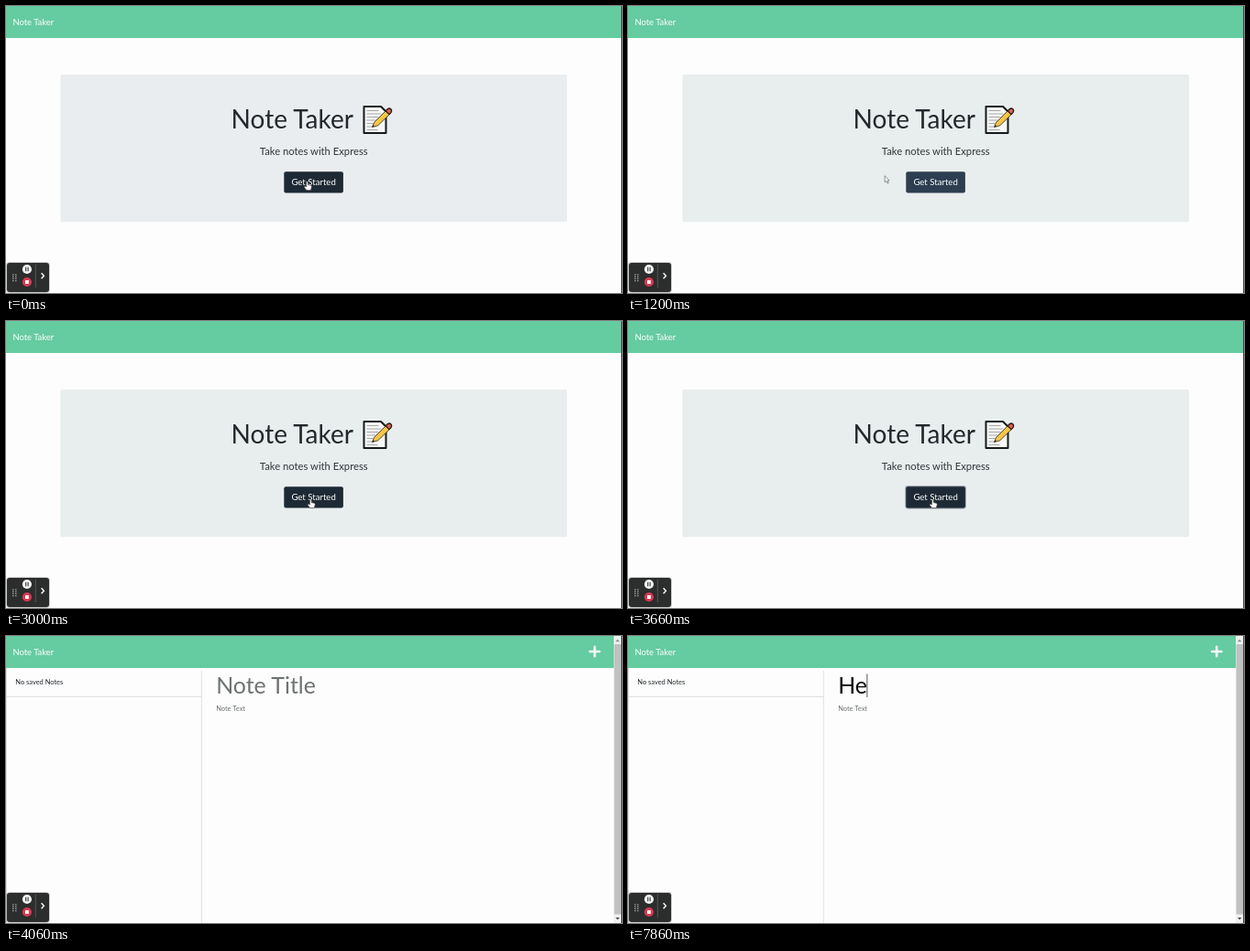
An HTML page for the animation above (8000 ms loop, 672 by 314 pixels).

```html
<!DOCTYPE html>
<html lang="en">
<head>
<meta charset="utf-8">
<title>Note Taker</title>
<style>
html, body { margin: 0; width: 100%; height: 100%; overflow: hidden; background: #fdfdfd; }
svg { display: block; width: 672px; height: 314px; font-family: Lato, sans-serif; }
</style>
</head>
<body>
<svg viewBox="0 0 672 314">
  <rect width="672" height="314" fill="#fdfdfd"/>
  <rect width="672" height="35" fill="#65cba0"/>
  <text x="7.5" y="20.8" font-size="9.4" fill="#fff">Note Taker</text>

  <g id="home">
    <rect id="panel" x="59.5" y="75" width="552.5" height="161.3" rx="1.5"/>
    <text x="245.6" y="134" font-size="28" fill="#23282c">Note Taker</text>
    <g stroke-linejoin="round">
      <path d="M390.5 110H409l5.5 5.5V139H390.5Z" fill="#f7f7f5" stroke="#15191b" stroke-width="2"/>
      <path d="M393.5 114.5h13M393.5 118h16M393.5 121.5h13M393.5 125h10M393.5 128.5h7M393.5 132h6M393.5 135.5h12" stroke="#a3a8aa"/>
      <path d="M399.5 132.5l2.2-5.2L416 113l4 4-14.3 13.8Z" fill="#f6c644" stroke="#2a2520" stroke-width=".8"/>
      <path d="M414.2 114.8l2-2q2-1.6 3.6 0t.2 3.8l-2 2Z" fill="#d9634f" stroke="#2a1a18" stroke-width="1.3"/>
      <path d="M399.5 132.5l1-2.5 1.6 1.6Z" fill="#222"/>
    </g>
    <text x="335.8" y="163" font-size="11.25" fill="#30363a" text-anchor="middle">Take notes with Express</text>
    <rect id="focus" x="302.4" y="180.2" width="66.4" height="25.2" rx="2.8" fill="#8d979f"/>
    <rect id="button" x="303.3" y="181.2" width="64.6" height="23.2" rx="2"/>
    <text x="335.6" y="196.3" font-size="9.6" fill="#fff" text-anchor="middle">Get Started</text>
  </g>

  <g id="notes">
    <path d="M637 17h10.4M642.2 11.8v10.4" stroke="#f4fbf8" stroke-width="2.6" stroke-linecap="round"/>
    <path d="M.5 35V314M213.3 38V314" stroke="#dedfdf"/>
    <g id="list">
      <path d="M0 66.5H213" stroke="#dedfdf"/>
      <text x="10.3" y="53.4" font-size="7.47" fill="#23282c">No saved Notes</text>
    </g>
    <text id="title" x="229.2" y="63.4" font-size="24.9"/>
    <rect id="caret" y="41.5" width="1" height="25.5" fill="#555"/>
    <text x="229.2" y="82.4" font-size="7.47" fill="#6c7072">Note Text</text>
    <circle id="ring" cx="267.3" cy="61.8" r="16.5" fill="none" stroke="#d2596b" stroke-width="1.5"/>
    <rect x="663" width="8.5" height="314" fill="#f1f1f1"/>
    <rect x="663.5" y="9" width="7.5" height="295.5" fill="#c1c1c1"/>
    <path d="M665 6.2h4.4l-2.2-2.6Z" fill="#8c8c8c"/>
    <path d="M665 308h4.4l-2.2 2.6Z" fill="#444"/>
  </g>
  <path d="M671.5 0V314" stroke="#474b4a"/>

  <g>
    <rect x="0" y="280" width="48" height="34" rx="4" fill="#000" opacity=".18"/>
    <rect x="1" y="281" width="46" height="32" rx="3" fill="#2c2d2d"/>
    <path d="M7.8 293.3v8M10.8 293.3v8" stroke="#c4c4c4" stroke-width="1.2" stroke-dasharray="1.2 1.05"/>
    <circle cx="22.9" cy="288" r="5.1" fill="#f3f3f3"/>
    <path d="M21.7 285.8v4.4M24.1 285.8v4.4" stroke="#333" stroke-width="1.1"/>
    <circle cx="22.9" cy="302" r="5.1" fill="#d83a50"/>
    <rect x="21" y="300.1" width="3.8" height="3.8" rx=".5" fill="#fff"/>
    <path d="M32.3 282.5V308" stroke="#606060" stroke-width=".8"/>
    <path d="M38.6 292.2l2.8 3-2.8 3" fill="none" stroke="#fff" stroke-width="1.4"/>
  </g>

  <g id="cursor" stroke-linejoin="round">
    <path id="arrow" d="M0 0V7.2l1.7-1.5 1.2 2.7 1.2-.5-1.2-2.6H5Z" fill="#fff" stroke="#666" stroke-width=".7"/>
    <path id="hand" d="M-.8 6V.8Q-.8-.2 0-.2T.9.8V3.6l3 .7q1.1.3 1 1.5L4.4 8 3.8 9.6H-.5L-3 6.6Q-3.3 5.5-2.2 5.3Z" fill="#fff" stroke="#555" stroke-width=".7"/>
  </g>
</svg>
<script>
const $ = id => document.getElementById(id);
const show = (id, on) => $(id).style.display = on ? '' : 'none';
const clamp = v => Math.max(0, Math.min(1, v));

// time, x, y of the pointer tip
const path = [
  [0, 328.5, 192], [430, 321, 191], [600, 296, 187], [660, 280.5, 185], [860, 272, 183],
  [930, 272, 183], [1330, 284, 187], [1800, 284, 187], [2130, 297, 192],
  [2530, 331, 194], [2800, 331, 194], [2860, 332.3, 195], [8000, 332.3, 195]
];

function pointer(t) {
  const i = path.findIndex(p => p[0] > t);
  const [t0, x0, y0] = path[i - 1], [t1, x1, y1] = path[i];
  const k = (t - t0) / (t1 - t0);
  return [x0 + (x1 - x0) * k, y0 + (y1 - y0) * k];
}

function mix(a, b, k) {
  return `rgb(${a.map((v, i) => Math.round(v + (b[i] - v) * k))})`;
}

function draw(t) {
  const home = t < 3730;
  show('home', home);
  show('notes', !home);
  show('list', t >= 3860);

  const [x, y] = pointer(t);
  const over = x > 303 && x < 368 && y > 181 && y < 205;
  $('cursor').setAttribute('transform', `translate(${x} ${y})`);
  show('cursor', t < 3800);
  show('hand', over);
  show('arrow', !over);

  const hover = 1 - clamp((t - 640) / 150) + clamp((t - 2200) / 150);
  $('button').setAttribute('fill', mix([44, 62, 80], [29, 41, 52], hover));
  $('panel').setAttribute('fill', t < 860 ? '#eaedef' : '#e8eeed');
  show('focus', t >= 3400);

  const typed = t < 7660 ? '' : t < 7860 ? 'H' : 'He';
  const title = $('title');
  title.textContent = typed || 'Note Title';
  title.setAttribute('fill', typed ? '#0b0c0c' : '#6e7271');
  $('caret').setAttribute('x', typed ? 229.2 + title.getComputedTextLength() - .6 : 229.2);
  show('caret', t >= 6130 && t < 6660 || t >= 7200);

  show('ring', t >= 6130 && t < 6330);
  $('ring').setAttribute('opacity', 1 - clamp((t - 6140) / 190));
}

function tick() {
  draw(performance.now() % 8000);
  requestAnimationFrame(tick);
}
tick();
</script>
</body>
</html>
```
